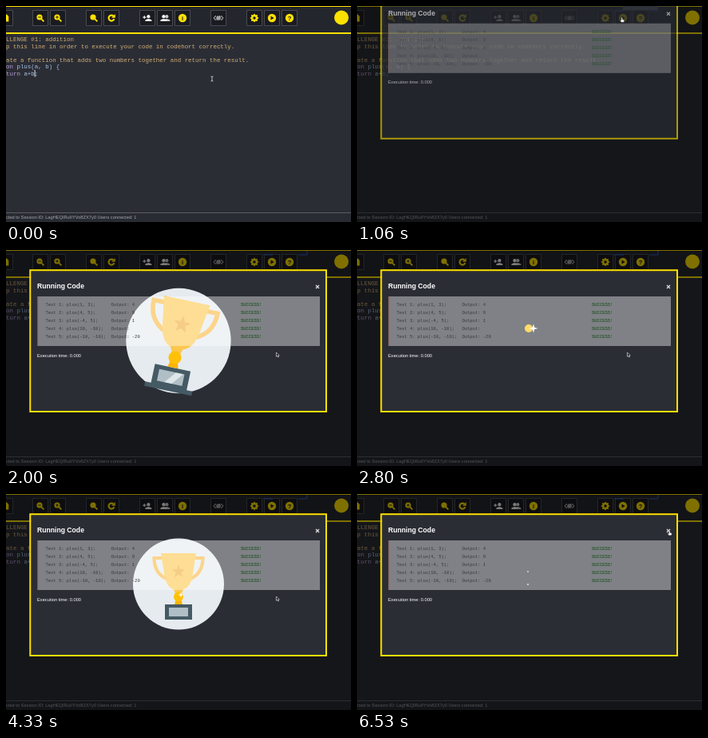
An HTML page with a canvas for the animation above (6600 ms loop, 432 px wide and 270 px high).

```html
<!DOCTYPE html>
<html lang="en">
<head>
<meta charset="utf-8">
<title>Running Code</title>
<style>
html, body { margin: 0; width: 100%; height: 100%; overflow: hidden; background: #2b2d35; }
canvas { display: block; width: 100vw; height: 100vh; }
</style>
</head>
<body>
<canvas></canvas>
<script>
const W = 432, H = 270, LOOP = 6600, STEP = LOOP / 99;
const YELLOW = '#ffe100', WHITE = '#f4f4f4';
const MONO = '"Liberation Mono", monospace', SANS = '"Liberation Sans", Arial, sans-serif';
const canvas = document.querySelector('canvas');
const c = canvas.getContext('2d');

const lerp = (a, b, p) => a + (b - a) * p;
const progress = (t, a, b) => Math.min(1, Math.max(0, (t - a) / (b - a)));
const smooth = p => p * p * (3 - 2 * p);
const backOut = p => 1 + 2.7 * (p - 1) ** 3 + 1.7 * (p - 1) ** 2;

// Interpolates keys of the form [time, ...values].
function track(t, keys) {
  let i = 1;
  while (i < keys.length - 1 && t > keys[i][0]) i++;
  const a = keys[i - 1], b = keys[i], p = smooth(progress(t, a[0], b[0]));
  return a.slice(1).map((v, k) => lerp(v, b[k + 1], p));
}
function rect(x, y, w, h, color) {
  c.fillStyle = color;
  c.fillRect(x, y, w, h);
}
function disc(x, y, r, color) {
  c.fillStyle = color;
  c.beginPath();
  c.arc(x, y, Math.max(0, r), 0, 7);
  c.fill();
}
function shape(d, fill) {
  c.fillStyle = fill;
  c.fill(new Path2D(d));
}
function line(d, color, width = 1) {
  c.strokeStyle = color;
  c.lineWidth = width;
  c.stroke(new Path2D(d));
}
function text(s, x, y, font, color, align = 'left') {
  c.font = font;
  c.fillStyle = color;
  c.textAlign = align;
  c.fillText(s, x, y);
}
function at(x, y, scale, angle, draw) {
  c.save();
  c.translate(x, y);
  c.rotate(angle);
  c.scale(scale, scale);
  draw();
  c.restore();
}
function star(points, outer, inner, color) {
  c.fillStyle = color;
  c.beginPath();
  for (let i = 0; i < points * 2; i++) {
    const r = i % 2 ? inner : outer, a = i * Math.PI / points - Math.PI / 2;
    c.lineTo(r * Math.cos(a), r * Math.sin(a));
  }
  c.fill();
}

// Toolbar icons, drawn around their button's centre.
function magnifier(sign) {
  line('M1.4 1.4L4.4 4.4', YELLOW, 1.9);
  disc(-1, -1, 3.6, YELLOW);
  line(sign, '#1a1b20', 0.9);
}
function person(x, color) {
  disc(x, -1.8, 2.1, color);
  shape(`M${x - 4} 4V2.6Q${x} -.4 ${x + 4} 2.6V4Z`, color);
}
function badge(mark) {
  disc(0, 0, 5.2, YELLOW);
  text(mark, 0, 2.7, 'bold 7.5px ' + SANS, '#1a1b20', 'center');
}
const BUTTONS = [
  [-1, () => shape('M-4 -4.5H2L4.3 -2V4.5H-4Z', YELLOW)],
  [43, () => magnifier('M-2.8 -1H.8')],
  [65, () => magnifier('M-2.8 -1H.8M-1 -2.8V.8')],
  [110, () => magnifier('')],
  [132, () => {
    line('M2.6 -2.4A3.5 3.5 0 1 0 3.4 1.2', YELLOW, 2.2);
    shape('M4.8 -5V-.2H0Z', YELLOW);
  }],
  [177, () => { person(1.4, WHITE); line('M-5.7 -.9H-1.7M-3.7 -2.9V1.1', WHITE, 1.1); }],
  [199, () => { person(2.3, '#ccc'); person(-1.6, WHITE); }],
  [221, () => badge('i')],
  [266, () => line('M-3.3 -3L-6 0L-3.3 3M3.3 -3L6 0L3.3 3M-3.5 -1H3.5M-3.5 1H3.5M-.5 -3L-1.4 3M1.6 -3L.7 3', WHITE, 0.8)],
  [311, () => { star(8, 5.6, 4, YELLOW); disc(0, 0, 1.7, '#1a1b20'); }],
  [333, () => { disc(0, 0, 5.2, YELLOW); shape('M-1.5 -2.6L2.7 0L-1.5 2.6Z', '#1a1b20'); }],
  [355, () => badge('?')]
];

const TAN = '#d0ae74', PURPLE = '#b9a0d8', BLUE = '#a6c2e6';
const CODE = [
  [0, 44.3, 'LLENGE #1: addition', TAN],
  [0, 52.8, 'p this line in order to execute your code in codehort correctly.', TAN],
  [0, 69.8, 'ate a function that adds two numbers together and return the result.', TAN],
  [0, 78.3, 'on', PURPLE], [3, 78.3, 'plus(a, b) {', BLUE],
  [0, 86.8, 'turn', PURPLE], [5, 86.8, 'a+b;', BLUE]
];
const TESTS = [
  ['plus(1, 3);', '4'], ['plus(4, 5);', '9'], ['plus(-4, 5);', '1'],
  ['plus(10, -10);', ''], ['plus(-10, -10);', '-20']
];

function drawPage(t) {
  rect(0, 0, W, H, '#2b2d35');
  rect(0, 0, W, 33, '#24262d');
  rect(0, 0, W, 1, YELLOW);
  rect(0, 33, W, 2, YELLOW);
  for (const [x, icon] of BUTTONS) {
    rect(x - 10, 5, 20, 20, '#1a1b20');
    line(`M${x - 9.5} 5.5h19v19h-19Z`, '#55575d', 0.8);
    at(x, 15, 1, 0, icon);
  }
  disc(420, 14.5, 9, YELLOW);
  if (t > 590 && t < 1700) rect(333, 0, 43, 5, '#73767f');
  if (t > 800) line('M322 6H334M366 6H377V1', '#3560c8');
  for (const [col, y, s, color] of CODE) text(s, col * 4.476, y, '7.46px ' + MONO, color);
  if (t < 530) rect(35.6, 80, 1, 8.5, '#e8e8e8');
  rect(0, 258, W, 1, '#5b5d63');
  rect(0, 259, W, 11, '#292b33');
  text('cted to Session ID: LagHEQIRuIIYVo8ZX7y0 Users connected: 1', 0, 265.6, '5.68px ' + SANS, '#a6a7ab');
}

function drawCup() {
  line('M-20 -32.5H-30.5Q-30.5 -13 -14 -6M20 -32.5H30.5Q30.5 -13 14 -6', '#f7b93f', 4.2);
  shape('M-22 -38.5H22L17.5 -10Q15 4 6 7L4 12H-4L-6 7Q-15 4 -17.5 -10Z', '#fcc74d');
  at(0, -15.5, 1, 0, () => star(5, 8.5, 3.6, '#f0ab35'));
}
function drawBase(plate, shine) {
  rect(-17, 25.5, 34, 19, '#455a64');
  rect(-12, 29.5, 24, 11, '#b0bec5');
  if (shine > 0) {
    c.save();
    c.beginPath();
    c.rect(-12, 29.5, 24, 11);
    c.clip();
    const x = lerp(-20, 5, shine);
    shape(`M${x} 40.5l9 -11h7l-9 11Z`, '#dfe6e9');
    c.restore();
  }
  rect(-22.5 * plate, 43.5, 45 * plate, 4.2, '#455a64');
}

function drawTrophy(t) {
  if (t < 1660) return;
  const first = t < 2330;
  const exit = first ? progress(t, 1630, 2310) : progress(t, 5770, 6450);
  const grown = smooth(progress(exit, 0, 0.54)), shrunk = progress(exit, 0.56, 1);
  const scale = (1 + 0.34 * grown) * (1 - shrunk ** 1.6);
  const angle = 0.21 * grown + 0.5 * shrunk;
  const [radius] = first ? [49] : track(t, [[3700, 0], [4230, 59], [4330, 57], [4700, 49]]);
  const cup = first ? 1 : backOut(progress(t, 2990, 3450));
  const base = first ? 1 : smooth(progress(t, 3250, 3600));
  const plate = first ? 1 : backOut(progress(t, 5130, 5500));
  const shine = first ? 0.6 : progress(t, 5300, 5860);
  const [ballX, ballY, ballR] = first ? [0, 16, 6]
    : track(t, [[2560, -1, -14.5, 0], [2760, -1, -14.5, 5], [2930, -1, -14.5, 5], [3260, 0, 16, 6]]);

  if (scale > 0.01) at(216, 112.5 + grown, scale, angle, () => {
    disc(0, 0, radius, '#e6ebf0');
    if (base > 0) at(0, 25.5 * (1 - base), base, 0, () => drawBase(plate, shine));
    if (base > 0) shape(`M-3 18H3L5 ${18 + 7.5 * base}H-5Z`, '#ffb300');
    if (cup > 0) at(0, -14.5 * (1 - cup), cup, 0, drawCup);
    disc(ballX, ballY, ballR, '#ffc107');
  });

  const glint = (x, y, r) => at(x, y, 1, 0, () => star(4, r, r * 0.32, '#fff'));
  if (t > 2530 && t < 3060) {
    const [x, y, r] = track(t, [[2530, 188, 70, 1], [2790, 221, 98, 5.5], [2860, 221, 98, 5.5], [3060, 222, 99, 0]]);
    glint(x, y, r);
  }
  if (t > 4130 && t < 4530) glint(219, 126, 3.6 * Math.sin(progress(t, 4130, 4530) * Math.PI));
  if (t > 6440 || (t > 2300 && t < 2530)) {
    disc(214, 97, 0.9, '#c9cccf');
    disc(214, 113, 0.9, '#dfe1e3');
  }
}

function drawModal(t) {
  c.globalAlpha = 0.5 * progress(t, 880, 1040);
  rect(0, 0, W, H, '#000');
  const p = progress(t, 970, 1270);
  c.globalAlpha = progress(t, 970, 1120);
  c.save();
  c.translate(0, -67.5 * (1 - p) ** 1.6);
  rect(31.3, 26.3, 368.7, 174.7, '#2b2d35');
  line('M30.3 25.3H401V202H30.3Z', YELLOW, 2);
  drawTrophy(t);
  rect(39, 58, 354, 62, 'rgba(255,255,255,.4)');
  rect(39, 58, 1.2, 62, '#7a5a55');
  text('Running Code', 39, 48.4, 'bold 8.64px ' + SANS, '#fff');
  line('M388 44L392 48M392 44L388 48', '#ddd', 1.3);
  TESTS.forEach(([call, output], i) => {
    const y = 70.4 + i * 10, font = '5.5px ' + MONO;
    text(`Test ${i + 1}: ${call}`, 49.4, y, font, '#34363b');
    text('Output: ' + output, 131.4, y, font, '#34363b');
    text('SUCCESS!', 294, y, font, '#0a4a10');
  });
  text('Execution time: 0.000', 39, 133.6, '5.72px ' + SANS, '#fff');
  c.restore();
  c.globalAlpha = 1;
}

function drawPointer(t) {
  const [x, y] = track(t, [
    [30, 258, 91], [600, 332, 17], [1630, 332, 17], [1960, 340, 131], [4400, 340, 131],
    [4950, 411, 50], [5250, 409, 34], [5600, 391.5, 48.5]
  ]);
  at(x, y, 1, 0, () => {
    if (t < 480) {
      line('M-1.5 -3Q0 -3 0 -2V2Q0 3 -1.5 3M1.5 -3Q0 -3 0 -2M0 2Q0 3 1.5 3', '#e5e5e5', 0.8);
    } else if (t < 1700 || t > 5500) {
      const hand = 'M-1 -2.5Q-.2 -3.3 .4 -2.3V-.2L2.6 .5V2.2L1.8 3.3H-1.2L-2.6 1L-1 .8Z';
      shape(hand, '#fff');
      line(hand, '#222', 0.4);
    } else {
      const arrow = 'M-1.6 -3V2.2L-.3 1.1L.6 3L1.5 2.6L.7 .8H2.2Z';
      shape(arrow, '#111');
      line(arrow, '#fff', 0.6);
    }
  });
}

function frame(now) {
  const ratio = devicePixelRatio || 1;
  const w = Math.round(innerWidth * ratio), h = Math.round(innerHeight * ratio);
  if (canvas.width !== w || canvas.height !== h) {
    canvas.width = w;
    canvas.height = h;
  }
  c.setTransform(w / W, 0, 0, h / H, 0, 0);
  const t = Math.floor((now % LOOP + 7) / STEP) % 99 * STEP;
  drawPage(t);
  drawModal(t);
  drawPointer(t);
  requestAnimationFrame(frame);
}
requestAnimationFrame(frame);
</script>
</body>
</html>
```
